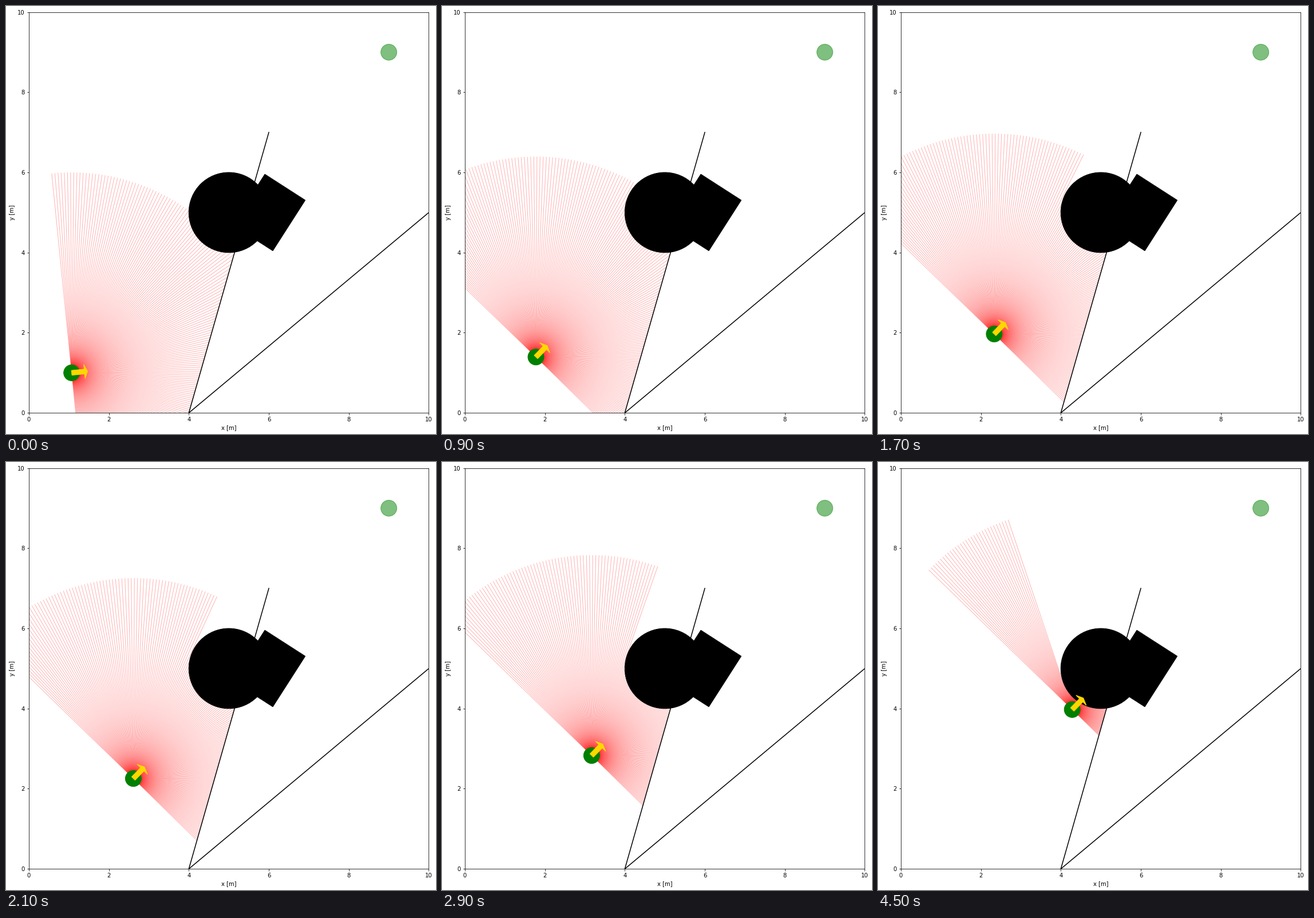
Animation of 751 by 746 pixels, one loop 4600 ms. Source, as a matplotlib script:

```python
import numpy as np
import matplotlib.pyplot as plt
from matplotlib.animation import FuncAnimation
from matplotlib.collections import LineCollection
from matplotlib.patches import Circle, Polygon, Rectangle

W, H, DPI = 751, 746, 72
FRAMES, INTERVAL = 46, 100
DT = INTERVAL / 1000

GOAL = np.array([9.0, 9.0])
RADIUS = 0.2
DISC, DISC_R = np.array([5.0, 5.0]), 1.0
WALLS = [((4, 0), (6, 7)), ((4, 0), (10, 5))]
RANGE = 5.0
BEAMS = np.linspace(-np.pi / 2, np.pi / 2, 200)

ARROW_LEN, ARROW_W = 0.4, 0.6
ARROW = np.array([(0, .1), (0, -.1), (.8, -.1), (.8, -.3),
                  (1, 0), (.8, .3), (.8, .1)]) * (ARROW_LEN, ARROW_W)


def drive(steps):
    """Differential drive to the goal: turn at 1 rad/s, slow down off course."""
    pos, theta, poses = np.array([1.0, 1.0]), 0.0, []
    for _ in range(steps):
        dx, dy = GOAL - pos
        diff = np.arctan2(dy, dx) - theta
        heading = np.array([np.cos(theta), np.sin(theta)])
        pos = pos + DT * np.cos(diff) * heading
        if diff > 0.05:
            theta += DT
        poses.append((pos, theta))
    return poses


def cross(a, b):
    return a[..., 0] * b[..., 1] - a[..., 1] * b[..., 0]


def scan(pos, theta):
    """Lidar beams as segments, cut at the first obstacle."""
    ang = theta + BEAMS
    d = np.column_stack([np.cos(ang), np.sin(ang)])
    dist = np.full(len(d), RANGE)

    to_disc = DISC - pos
    along = d @ to_disc
    disc = along ** 2 - to_disc @ to_disc + DISC_R ** 2
    hit = along - np.sqrt(np.maximum(disc, 0))
    dist = np.where((disc > 0) & (hit > 0), np.minimum(dist, hit), dist)

    for a, b in WALLS:
        a, b = np.array(a, float), np.array(b, float)
        den = cross(d, b - a)
        t = cross(a - pos, b - a) / den
        u = cross(a - pos, d) / den
        ok = (t > 0) & (u >= 0) & (u <= 1)
        dist = np.where(ok, np.minimum(dist, t), dist)

    ends = pos + d * dist[:, None]
    return np.stack([np.broadcast_to(pos, ends.shape), ends], axis=1)


def arrow_xy(pos, theta):
    c, s = np.cos(theta), np.sin(theta)
    return pos + ARROW @ np.array([[c, s], [-s, c]])


POSES = drive(FRAMES)

fig = plt.figure(figsize=((W + 1e-6) / DPI, (H + 1e-6) / DPI), dpi=DPI,
                 facecolor="white")
side = 698.55
ax = fig.add_axes([39.9 / W, 36.8 / H, side / W, side / H])
ax.set(xlim=(0, 10), ylim=(0, 10), xlabel="x [m]", ylabel="y [m]")
ax.set_xticks(range(0, 11, 2))
ax.set_yticks(range(0, 11, 2))
ax.set_autoscale_on(False)

beams = LineCollection([], linewidths=1, colors="r", alpha=0.3, zorder=0)
ax.add_collection(beams)

ax.add_patch(Circle(DISC, DISC_R, color="k"))
ax.add_patch(Rectangle((5.25, 4.4), 1.5, 1.2, angle=np.degrees(1),
                       rotation_point="center", color="k"))
for (x0, y0), (x1, y1) in WALLS:
    ax.plot([x0, x1], [y0, y1], color="k", lw=1.5)

ax.add_patch(Circle(GOAL, RADIUS, color="g", alpha=0.5))
robot = ax.add_patch(Circle((1, 1), RADIUS, color="g", zorder=2.5))
arrow = ax.add_patch(Polygon(ARROW, color="gold", zorder=3))


def update(i):
    pos, theta = POSES[i]
    beams.set_segments(scan(pos, theta))
    robot.center = tuple(pos)
    arrow.set_xy(arrow_xy(pos, theta))
    return beams, robot, arrow


anim = FuncAnimation(fig, update, frames=FRAMES, interval=INTERVAL,
                     repeat=True, repeat_delay=0, blit=False)
plt.show()
```
